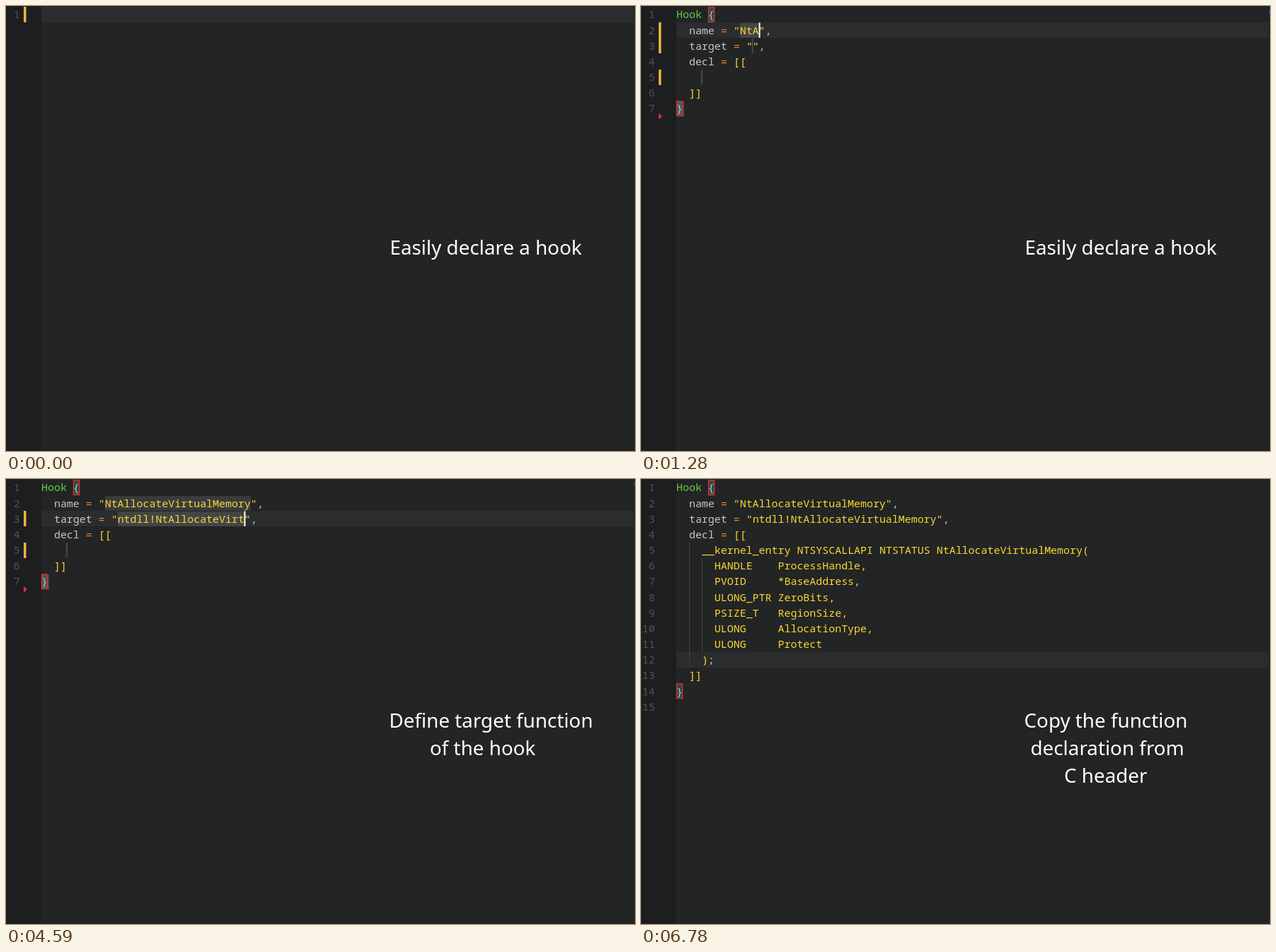
Recreate the animation shown at these times as an HTML page with a canvas. Size 889 by 630 pixels, loop 6920 ms.

```html
<!DOCTYPE html>
<html lang="en">
<head>
<meta charset="utf-8">
<title>Declaring a hook</title>
<style>
html, body { margin: 0; width: 100%; height: 100%; overflow: hidden; background: #232425; }
canvas { display: block; }
</style>
</head>
<body>
<canvas id="stage" width="889" height="630"></canvas>
<script>
const ctx = document.getElementById('stage').getContext('2d');
const LOOP = 6920, LEFT = 50, CW = 8.97, LH = 22.17;
const MONO = '14.95px "Noto Sans Mono", "DejaVu Sans Mono", monospace';
const SANS = '27.8px "Noto Sans", "Open Sans", sans-serif';
const PLAIN = '#c6c6c6', YELLOW = '#fad832', CYAN = '#22bde6', MARK = '#f3b33d';
const NAME = 'NtAllocateVirtualMemory', TARGET = 'ntdll!' + NAME;

// Runs of keystrokes: first change, last change, number of changes
const steps = [
  [90, 710, 9], [790, 1440, 9], [1520, 2160, 9], [2250, 2870, 9], [2950, 3580, 9],
  [3660, 4350, 10], [4430, 5090, 9], [5170, 5840, 10], [5930, 6550, 9], [6630, 6780, 3]
].flatMap(([a, b, n]) => Array.from({ length: n }, (_, i) =>
  a + (b - a) * i / (n - 1) - (i && i < n - 1 ? 12 : 0)));

const typed = ['', 'h', 'hy', 'hyp', 'hyp', 'hyp', 'hyp ', 'hyp ', 'hyp h', 'hyp h', 'hyp ho'];

// Completion rows: icon letter, label with matches in brackets, detail after a bar
const EVENT = '|Event (Workspace Snip…', HOOK = '|Hook (Workspace Snipp…', PROBE = '|Probe (Workspace Snip…';
const lists = {
  hyp: ['s[hy]p Event' + EVENT, 's[hy]p Hook' + HOOK, 's[hy]p Probe' + PROBE,
    'c_[HY]PERIONIX', 'c[H]KE[Y]_CLASSES_ROOT', 'c[H]KE[Y]_CURRENT_USER', 'c[H]KE[Y]_LOCAL_MACHINE',
    'c[H]KE[Y]_USERS', 'c[H]ookEntr[y]', 'eWTD_[H]ASH_ONL[Y]_FLAG',
    'eTHREAD_CREATE_FLAGS_[H]AS_SECURIT[Y]_DESCRIPTOR', 'eREG_APP_[H]IVE_OPEN_READ_ONL[Y]'],
  'hyp ': ['s[hyp ]Event' + EVENT, 's[hyp ]Hook' + HOOK, 's[hyp ]Probe' + PROBE],
  'hyp h': ['s[hyp H]ook' + HOOK, 'c[h]ookobj', 'c[h]p', 'c[h]pint', 'c[h]yp',
    's[h]yp Event' + EVENT, 's[h]yp Probe' + PROBE, 'c[H]KEY_CLASSES_ROOT', 'c[H]KEY_CURRENT_USER',
    'c[H]KEY_LOCAL_MACHINE', 'c[H]KEY_USERS', 'e[H]P_ALGID'],
  'hyp ho': ['s[hyp Ho]ok' + HOOK, 'c[ho]okobj']
};

const declaration = [
  '    __kernel_entry NTSYSCALLAPI NTSTATUS NtAllocateVirtualMemory(',
  '      HANDLE    ProcessHandle,',
  '      PVOID     *BaseAddress,',
  '      ULONG_PTR ZeroBits,',
  '      PSIZE_T   RegionSize,',
  '      ULONG     AllocationType,',
  '      ULONG     Protect',
  '    );'
];

const captions = [
  [[544.5, 'Easily declare a hook']],
  [[543.5, 'Define target function'], [601, 'of the hook']],
  [[543.5, 'Copy the function'], [552.5, 'declaration from'], [600, 'C header']]
];

const clamp = (v, hi) => Math.max(0, Math.min(hi, v));
const colX = c => LEFT + c * CW;
const rowY = r => 1 + r * LH;

function rect(x, y, w, h, color) {
  ctx.fillStyle = color;
  ctx.fillRect(x, y, w, h);
}

function text(s, x, y, color, font = MONO, align = 'left') {
  ctx.font = font;
  ctx.textAlign = align;
  ctx.fillStyle = color;
  ctx.fillText(s, x, y);
}

function path(points, color, close) {
  ctx.beginPath();
  points.forEach(([x, y]) => ctx.lineTo(x, y));
  if (close) ctx.closePath();
  ctx.strokeStyle = color;
  ctx.stroke();
}

function code(row, line, color) {
  for (const m of line.matchAll(/"[^"]*"|\[\[|\]\]|=|[^\s"=\[\]]+/g)) {
    const s = m[0];
    const own = s === 'Hook' ? '#5fd040' : s === '=' ? '#ee8a30' : /^["\[\]]/.test(s) ? YELLOW : PLAIN;
    text(s, colX(m.index), rowY(row) + 16.4, color || own);
  }
}

const highlight = row => rect(LEFT, Math.round(rowY(row)), 837, 22, '#2b2c2e');
const changed = row => rect(25, Math.round(rowY(row)), 3.5, 22, MARK);
const stop = (row, col, len, color = '#434547') =>
  rect(colX(col) - (len ? 0 : 1.2), rowY(row) + 1, len * CW || 2.5, 20.5, color);

function caret(row, col, alpha = 1) {
  ctx.globalAlpha = alpha;
  rect(Math.round(colX(col)) - .5, Math.round(rowY(row)) + .5, 2, 21.5, '#fff');
  ctx.globalAlpha = 1;
}

function bracket(row, col, s, fill) {
  const x = Math.round(colX(col)) + .5, y = Math.round(rowY(row)) + 1;
  rect(x, y, 8, 20.5, fill);
  text(s, colX(col), rowY(row) + 16.4, '#9ad3d3');
  ctx.lineWidth = 1.4;
  ctx.strokeStyle = '#e8301f';
  ctx.strokeRect(x, y, 8, 20.5);
}

function triangle(row) {
  const y = rowY(row);
  ctx.beginPath();
  ctx.moveTo(25, y - 4.5);
  ctx.lineTo(30, y);
  ctx.lineTo(25, y + 4.5);
  ctx.fillStyle = '#e2273f';
  ctx.fill();
}

function squiggle(chars) {
  const points = [];
  for (let x = LEFT; x <= colX(chars); x++) points.push([x, 20.8 + 1.3 * Math.sin((x - LEFT) * 1.05)]);
  ctx.lineWidth = 1.1;
  path(points, '#e0694a');
}

const icons = {
  s(x, y) {
    ctx.lineWidth = 1.3;
    path([[x - 7.5, y + 8], [x - 7.5, y - 7.5], [x + 7.5, y - 7.5], [x + 7.5, y + 8]], PLAIN);
    for (let i = -6; i < 7; i += 2.5) rect(x + i, y + 6.8, 1.3, 1.3, PLAIN);
  },
  c(x, y) {
    ctx.lineWidth = 1.4;
    path([[x - 7.5, y - 2.5], [x + 1.5, y - 6.5], [x + 7.5, y - 3.5], [x + 7.5, y + 3],
      [x - 1.5, y + 7], [x - 7.5, y + 3.5]], '#75beff', true);
    path([[x - 7.5, y - 2.5], [x - 1.5, y + .5], [x + 7.5, y - 3.5]], '#75beff');
    path([[x - 1.5, y + .5], [x - 1.5, y + 7]], '#75beff');
  },
  e(x, y) {
    const c = '#ee9d28';
    ctx.lineWidth = 1.3;
    path([[x - 1, y - 1.5], [x - 1, y - 6.5], [x + 7.5, y - 6.5], [x + 7.5, y + 1], [x + 3, y + 1]], c);
    path([[x - 7.5, y - 1], [x + 1, y - 1], [x + 1, y + 6.5], [x - 7.5, y + 6.5]], c, true);
    rect(x - 5.5, y + 1, 4.5, 1.2, c);
    rect(x - 5.5, y + 3.5, 4.5, 1.2, c);
    rect(x + 1, y - 4, 4.5, 1.2, c);
    rect(x + 3, y - 1.5, 2.5, 1.2, c);
  }
};

function popup(rows, col, selected) {
  const x = Math.round(colX(col)), h = Math.round(rows.length * LH);
  rect(x, 24, 501, h, '#3b3c3d');
  if (col === 5) rect(x + 488, 24, 12, 80, '#4d4e50');
  rect(x, 24.5 + selected * LH, 500, LH, '#555658');
  rows.forEach((row, i) => {
    const mid = 35.8 + i * LH, [label, detail] = row.slice(1).split('|');
    icons[row[0]](x + 13, mid);
    let c = 0;
    label.split(/[\[\]]/).forEach((part, k) => {
      text(part, x + 26 + c * CW, mid + 5, k % 2 ? CYAN : PLAIN, k % 2 ? 'bold ' + MONO : MONO);
      c += part.length;
    });
    if (detail) text(detail, x + 282.5, mid + 5, '#939495');
  });
  ctx.lineWidth = 1;
  ctx.strokeStyle = '#5b5c5e';
  ctx.strokeRect(x + .5, 24.5, 500, h - 1);
}

function numbers(count) {
  for (let i = 0; i < count; i++) text(i + 1, 19.7, rowY(i) + 16.4, '#515355', MONO, 'right');
}

function drawPrompt(n) {
  const s = typed[n];
  highlight(0);
  changed(0);
  numbers(1);
  code(0, s);
  if (!n) return;
  squiggle(s.length);
  caret(0, s.length);
  if (n > 2 && lists[s]) popup(lists[s], s.length, n < 8 ? 1 : 0);
}

function drawHook(n) {
  const nameLen = clamp(n - 13, 23);
  const targetLen = clamp(n - 38 - (n > 60), 29);
  const pasted = n > 75, saved = n > 79, selecting = n === 75;
  const row = pasted ? 11 : n > 68 ? 4 : n > 36 ? 2 : 1;
  const col = [0, 10 + nameLen, 12 + targetLen, 0, 4][row] ?? 6;
  const body = pasted ? declaration : [''];
  const end = 5 + body.length;

  if (!selecting) highlight(row);
  if (n < 69) {
    stop(1, 10, nameLen, row === 1 ? '#434547' : '#3a3b3d');
    stop(2, 12, targetLen);
    stop(4, 4, 0);
  }
  if (selecting) {
    ctx.beginPath();
    ctx.roundRect(LEFT, rowY(4) + 1, 4 * CW, 21.5, 3);
    ctx.fillStyle = '#6d3034';
    ctx.fill();
    for (let c = 0; c < 4; c++) rect(colX(c + .5) - .5, rowY(4) + 11, 1.3, 1.3, '#8a4a4e');
  }
  if (pasted) {
    rect(68, rowY(4), 1, LH * 8, '#3e4042');
    rect(86, rowY(5), 1, LH * 6, '#3e4042');
  }

  numbers(end + 1 + (n > 78));
  code(0, 'Hook {');
  code(1, `  name = "${NAME.slice(0, nameLen)}",`);
  code(2, `  target = "${TARGET.slice(0, targetLen)}",`);
  code(3, '  decl = [[');
  body.forEach((line, i) => code(4 + i, line, YELLOW));
  code(end - 1, '  ]]');
  code(end, '}');

  if (!selecting) {
    if (n < 69) rect(colX(1), rowY(end) + 1, 1.8, 21.5, '#4a4c4e');
    bracket(0, 5, '{', '#254c4e');
    bracket(end, 0, '}', n < 69 ? '#435b60' : '#254c4e');
  }
  if (!saved) {
    if (n < 37) changed(1);
    if (n < 69) changed(2);
    body.forEach((_, i) => changed(4 + i));
    triangle(end + 1 + (n > 78));
  }
  if (n < 69) rect(888, 5, 1, 6, '#1f7680');
  caret(row, col, n > 83 ? (86 - n) / 3 : 1);
}

function draw(now) {
  const t = now % LOOP;
  const n = steps.filter(s => s <= t + .01).length;
  rect(0, 0, 889, 630, '#232425');
  rect(0, 0, LEFT, 630, '#1d1e20');
  n < typed.length ? drawPrompt(n) : drawHook(n);
  captions[n < 37 ? 0 : n < 69 ? 1 : 2].forEach(([x, s], i) =>
    text(s, x - 2, 352 + i * 38.8, '#fff', SANS));
}

const start = performance.now();
function tick() {
  draw(performance.now() - start);
  requestAnimationFrame(tick);
}
tick();
</script>
</body>
</html>
```
